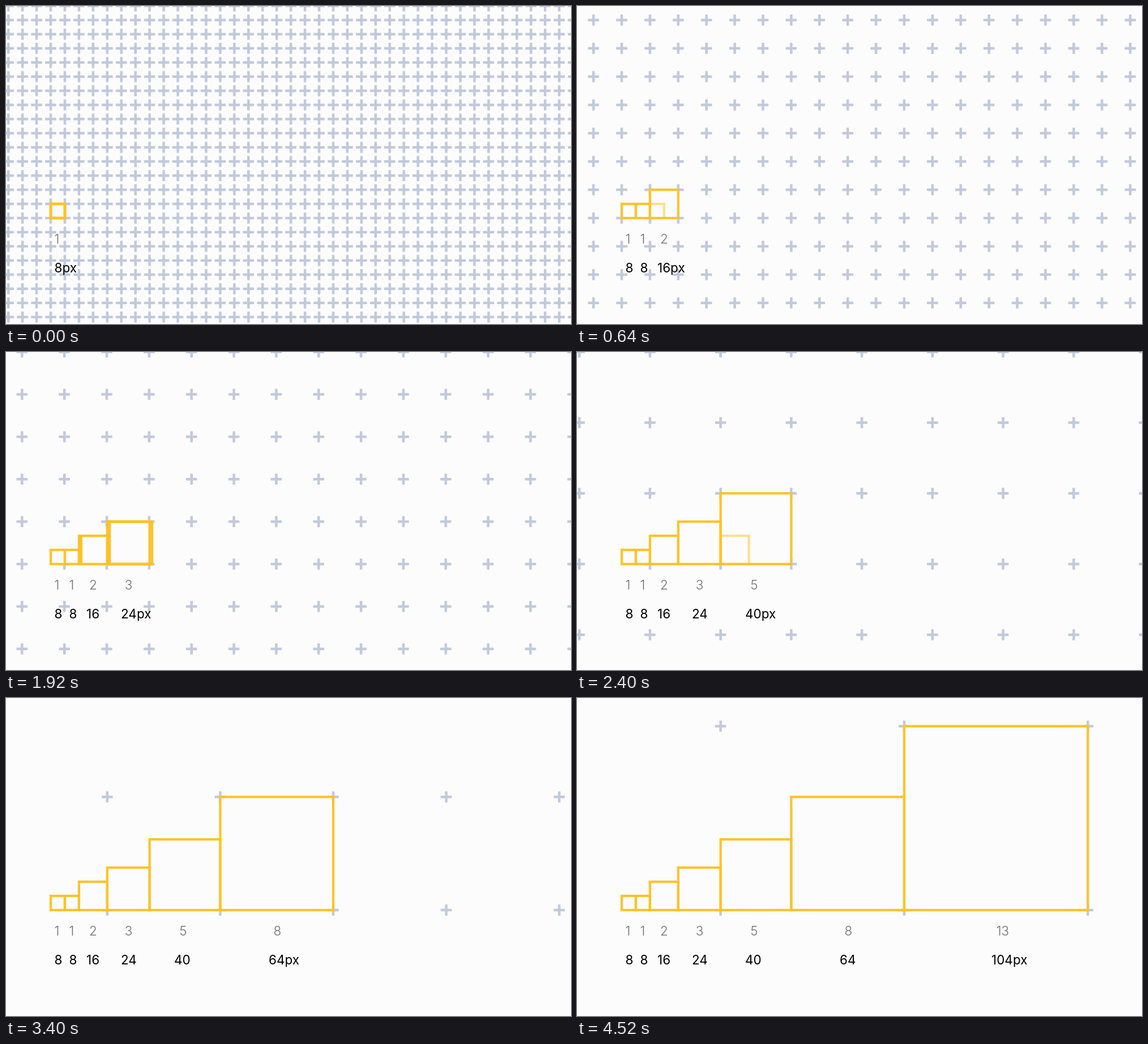
Animation of 998x561 px, one loop 6000 ms. Source, as an HTML page with a canvas:

```html
<!DOCTYPE html>
<html lang="en">
<head>
<meta charset="utf-8">
<title>Fibonacci spacing scale</title>
<style>
  html, body { margin: 0; width: 100%; height: 100%; overflow: hidden; background: #fcfcfc; }
  canvas { display: block; }
</style>
</head>
<body>
<canvas id="stage" width="998" height="561"></canvas>
<script>
const ctx = document.getElementById('stage').getContext('2d');
const W = 998, H = 561, LOOP = 6000, TICK = 40;
const UNIT = 24.95, LEFT = 79, BASE = 374.1, GROW = 280;
const PAPER = '#fcfcfc', GOLD = '#ffc229', CROSS = '#c2c9dc';

const fib = [1, 1, 2, 3, 5, 8, 13];
const starts = fib.map((_, i) => fib.slice(0, i).reduce((a, b) => a + b, 0));
const countX = [90, 116, 154, 216.5, 313, 479.5, 752];
const pixelX = [85.5, 111.5, 142, 203, 297, 464, 732];

// Per new square: copies slide, the larger one grows, the smaller one fades
const steps = [
  null,
  { slide: 20, grow: 150, fade: 150, end: 160 },
  { slide: 150, grow: 260, fade: 540, end: 740 },
  { slide: 720, grow: 966, fade: 1300, end: 1500 },
  { slide: 1890, grow: 2040, fade: 2300, end: 2500 },
  { slide: 2500, grow: 3033, fade: 3220, end: 3400 },
  { slide: 3925, grow: 4113, fade: 4320, end: 4520 }
];

const clamp = v => Math.max(0, Math.min(1, v));
const span = (t, from, to) => clamp((t - from) / (to - from));
const ease = x => x < 0.5 ? 4 * x ** 3 : 1 - 4 * (1 - x) ** 3;
const px = units => LEFT + units * UNIT;

function layout(t) {
  const squares = [{ x: 0, size: 1, line: t < TICK ? 5 : 4.2, alpha: 1 }];
  let grid = { pitch: 1, anchor: 0 }, last = 0;
  for (let n = 1; n < fib.length && t >= steps[n].slide; n++) {
    const { slide, grow, fade, end } = steps[n];
    const s = ease(span(t, slide, grow));
    const g = ease(span(t, grow, grow + GROW));
    const big = fib[n - 1], small = n > 1 ? fib[n - 2] : 0;
    const size = big + small * g;
    const right = starts[n] + fib[n] * s;
    const alpha = 1 - span(t, fade, end);
    if (small && alpha > 0) {
      const from = starts[n - 2];
      squares.push({ x: from + (starts[n] - from) * s, size: small, line: 4.2, alpha });
    }
    squares.push({ x: right - size, size, line: Math.max(4.2, 5 - 2 * g), alpha: 1 });
    const shift = n > 1 ? (small - big) * s : 0;
    grid = { pitch: size, anchor: s === 1 ? right : starts[n] + shift };
    if (t >= grow - 60) last = n;
  }
  return { squares, grid, last };
}

function drawGrid({ pitch, anchor }) {
  const step = pitch * UNIT, arm = 9.8, thick = 4.5;
  const first = (v) => v - Math.ceil((v + arm) / step) * step;
  ctx.fillStyle = CROSS;
  for (let x = first(px(anchor)); x < W + arm; x += step)
    for (let y = first(BASE); y < H + arm; y += step) {
      ctx.fillRect(x - arm, y - thick / 2, arm * 2, thick);
      ctx.fillRect(x - thick / 2, y - arm, thick, arm * 2);
    }
}

function drawSquares(squares) {
  const box = q => [px(q.x), BASE - q.size * UNIT, q.size * UNIT, q.size * UNIT];
  ctx.fillStyle = PAPER;
  squares.forEach(q => ctx.fillRect(...box(q)));
  ctx.strokeStyle = GOLD;
  for (const q of squares) {
    ctx.globalAlpha = q.alpha;
    ctx.lineWidth = q.line;
    ctx.strokeRect(...box(q));
  }
  ctx.globalAlpha = 1;
}

function drawLabels(last) {
  for (let i = 0; i <= last; i++) {
    ctx.font = '300 22.5px Inter, sans-serif';
    ctx.textAlign = 'center';
    ctx.fillStyle = '#707070';
    ctx.fillText(fib[i], countX[i], 419);
    ctx.font = '400 22.5px Inter, sans-serif';
    ctx.textAlign = 'left';
    ctx.fillStyle = '#000';
    ctx.fillText(fib[i] * 8 + (i === last ? 'px' : ''), pixelX[i], 469.5);
  }
}

function frame(now) {
  const t = Math.floor(now % LOOP / TICK) * TICK;
  const { squares, grid, last } = layout(t);
  ctx.fillStyle = PAPER;
  ctx.fillRect(0, 0, W, H);
  drawGrid(grid);
  drawSquares(squares);
  drawLabels(last);
  requestAnimationFrame(frame);
}
requestAnimationFrame(frame);
</script>
</body>
</html>
```
